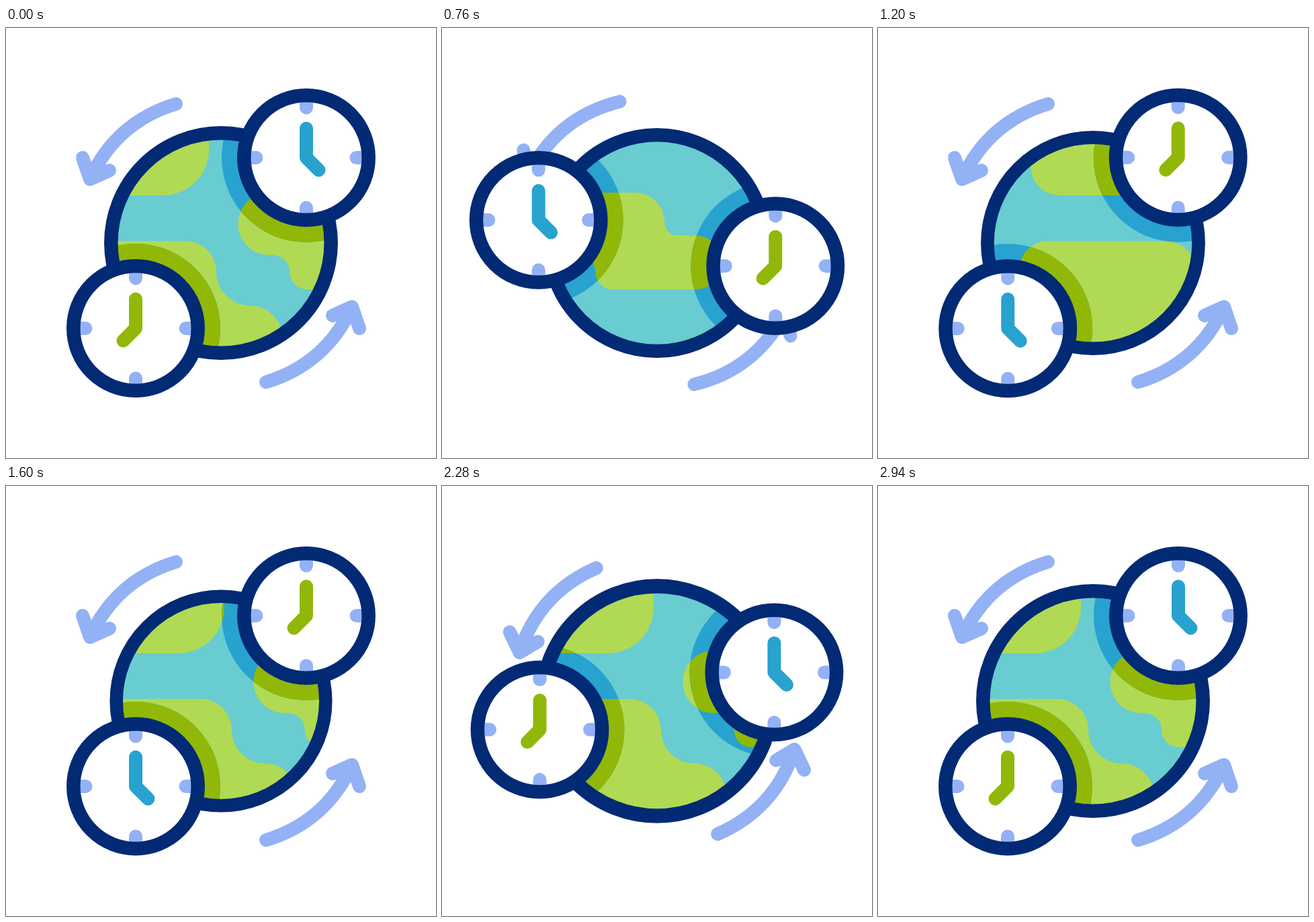
These frames come from a looping animation (640 px wide and 640 px high, 3.3 s). An HTML page with a canvas:

```html
<!DOCTYPE html>
<html lang="en">
<head>
<meta charset="utf-8">
<title>Time zones</title>
<style>
  html, body { margin: 0; width: 100%; height: 100%; overflow: hidden; background: #fff; }
  canvas { display: block; width: 640px; height: 640px; }
</style>
</head>
<body>
<canvas id="stage"></canvas>
<script>
const LOOP = 3300, HALF = 1480, TAU = Math.PI * 2;
const ARROW_DELAY = 191.3, CLOCK_DELAY = 291.6;
const MID = 320, ORBIT = 179.6, SHADE = 126, WRAP = 700;
const NAVY = '#022a75', PALE = '#93b1f5', BLUE = '#28a2cf', LEAF = '#91b808';
const SEA = '#68ccd1', LAND = '#b0da53';

const canvas = document.getElementById('stage');
const ctx = canvas.getContext('2d');
const ratio = window.devicePixelRatio || 1;
canvas.width = canvas.height = 640 * ratio;

const smooth = p => p * p * (3 - 2 * p);
const rad = deg => deg * Math.PI / 180;

// Half a turn with a wind-up and an overshoot, in degrees
function halfTurn(t) {
  const keys = [[0, 0], [208, -8], [631, 188], [931, 180]];
  if (t <= 0) return 0;
  for (let i = 1; i < keys.length; i++) {
    const [t0, a] = keys[i - 1], [t1, b] = keys[i];
    if (t < t1) return a + (b - a) * smooth((t - t0) / (t1 - t0));
  }
  return 180;
}
const turn = t => halfTurn(t) + halfTurn(t - HALF);

// Monotone cubic curve through [time, value] points
function track(keys, t) {
  const n = keys.length;
  if (t <= keys[0][0]) return keys[0][1];
  if (t >= keys[n - 1][0]) return keys[n - 1][1];
  const slope = i => (keys[i + 1][1] - keys[i][1]) / (keys[i + 1][0] - keys[i][0]);
  const tangent = i => {
    if (i === 0 || i === n - 1) return 0;
    const a = slope(i - 1), b = slope(i);
    return a * b <= 0 ? 0 : 2 * a * b / (a + b);
  };
  let i = 0;
  while (t >= keys[i + 1][0]) i++;
  const [t0, a] = keys[i], [t1, b] = keys[i + 1];
  const d = t1 - t0, p = (t - t0) / d, q = 1 - p;
  return a + (b - a) * smooth(p) + d * p * q * (q * tangent(i) - p * tangent(i + 1));
}

const scrollKeys = [[200, 0], [420, 13], [540, 0], [760, -193], [1200, 161 - WRAP],
  [1980, -35 - WRAP], [2290, 13 - WRAP], [2950, -WRAP]];
const sizeKeys = [[200, 174], [420, 176.5], [540, 175], [760, 171], [1200, 167],
  [1980, 165], [2300, 182], [2950, 174]];

function makeLands() {
  const p = new Path2D();
  // north
  p.moveTo(67, 60);
  p.lineTo(67, 207);
  p.arcTo(67, 249, 109, 249, 42);
  p.lineTo(234, 249);
  p.arcTo(302, 249, 302, 181, 68);
  p.lineTo(302, 60);
  p.closePath();
  // south
  p.moveTo(50, 560);
  p.lineTo(50, 359);
  p.arcTo(50, 317, 92, 317, 42);
  p.lineTo(267, 317);
  p.arcTo(313, 317, 313, 363, 46);
  p.arcTo(313, 413, 363, 413, 50);
  p.arcTo(411, 413, 411, 461, 48);
  p.lineTo(411, 560);
  p.closePath();
  // east
  p.moveTo(481, 245);
  p.arcTo(525, 245, 525, 289, 44);
  p.arcTo(525, 309, 545, 309, 20);
  p.lineTo(571, 309);
  p.arc(571, 349, 40, -Math.PI / 2, Math.PI / 2);
  p.lineTo(449, 389);
  p.arcTo(422, 389, 422, 363, 26);
  p.arcTo(422, 338, 397, 338, 25);
  p.lineTo(392, 338);
  p.arc(392, 291.5, 46.5, Math.PI / 2, -Math.PI / 2);
  p.closePath();
  return p;
}
const lands = makeLands();

function disc(x, y, r) {
  ctx.beginPath();
  ctx.arc(x, y, r, 0, TAU);
}

function line(points, color) {
  ctx.beginPath();
  points.forEach(([x, y]) => ctx.lineTo(x, y));
  ctx.strokeStyle = color;
  ctx.lineWidth = 20;
  ctx.stroke();
}

function surface(sea, land, scroll) {
  ctx.fillStyle = sea;
  ctx.fillRect(0, 0, 640, 640);
  ctx.fillStyle = land;
  for (const x of [scroll, scroll + WRAP]) {
    ctx.save();
    ctx.translate(x, 0);
    ctx.fill(lands);
    ctx.restore();
  }
}

function globe(t, clocks) {
  const r = track(sizeKeys, t), k = r / 174, scroll = track(scrollKeys, t);
  ctx.save();
  disc(MID, MID, 160 * k);
  ctx.clip();
  surface(SEA, LAND, scroll);
  for (const c of clocks) {
    ctx.save();
    disc(c.x, c.y, SHADE);
    ctx.clip();
    surface(BLUE, LEAF, scroll);
    ctx.restore();
  }
  ctx.restore();
  disc(MID, MID, 163.7 * k);
  ctx.strokeStyle = NAVY;
  ctx.lineWidth = 20.5 * k;
  ctx.stroke();
}

function arrow(deg) {
  ctx.save();
  ctx.translate(MID, MID);
  ctx.rotate(-rad(deg));
  ctx.beginPath();
  ctx.moveTo(-67, -207);
  ctx.quadraticCurveTo(-156, -180, -195, -95);
  ctx.moveTo(-206, -127);
  ctx.lineTo(-195, -95);
  ctx.lineTo(-166, -108);
  ctx.strokeStyle = PALE;
  ctx.lineWidth = 20;
  ctx.stroke();
  ctx.restore();
}

function clock({ x, y, color, side }) {
  ctx.save();
  ctx.translate(x, y);
  disc(0, 0, 93);
  ctx.fillStyle = '#fff';
  ctx.fill();
  for (const [dx, dy] of [[0, -1], [1, 0], [0, 1], [-1, 0]])
    line([[dx * 74.5, dy * 74.5], [dx * 88, dy * 88]], PALE);
  disc(0, 0, 92.7);
  ctx.strokeStyle = NAVY;
  ctx.lineWidth = 20.5;
  ctx.stroke();
  line([[0, -43.5], [0, 0], [side * 18.5, 18.5]], color);
  ctx.restore();
}

function place(deg, color, side) {
  const a = rad(deg);
  return { x: MID + ORBIT * Math.cos(a), y: MID - ORBIT * Math.sin(a), color, side };
}

function draw(t) {
  ctx.setTransform(ratio, 0, 0, ratio, 0, 0);
  ctx.fillStyle = '#fff';
  ctx.fillRect(0, 0, 640, 640);
  ctx.lineCap = ctx.lineJoin = 'round';

  const spin = turn(t - ARROW_DELAY), orbit = 45 + turn(t - CLOCK_DELAY);
  const clocks = [place(orbit, BLUE, 1), place(orbit + 180, LEAF, -1)];
  arrow(spin);
  arrow(spin + 180);
  globe(t, clocks);
  clocks.forEach(clock);
}

const start = performance.now();
function tick() {
  draw((performance.now() - start) % LOOP);
  requestAnimationFrame(tick);
}
tick();
</script>
</body>
</html>
```
